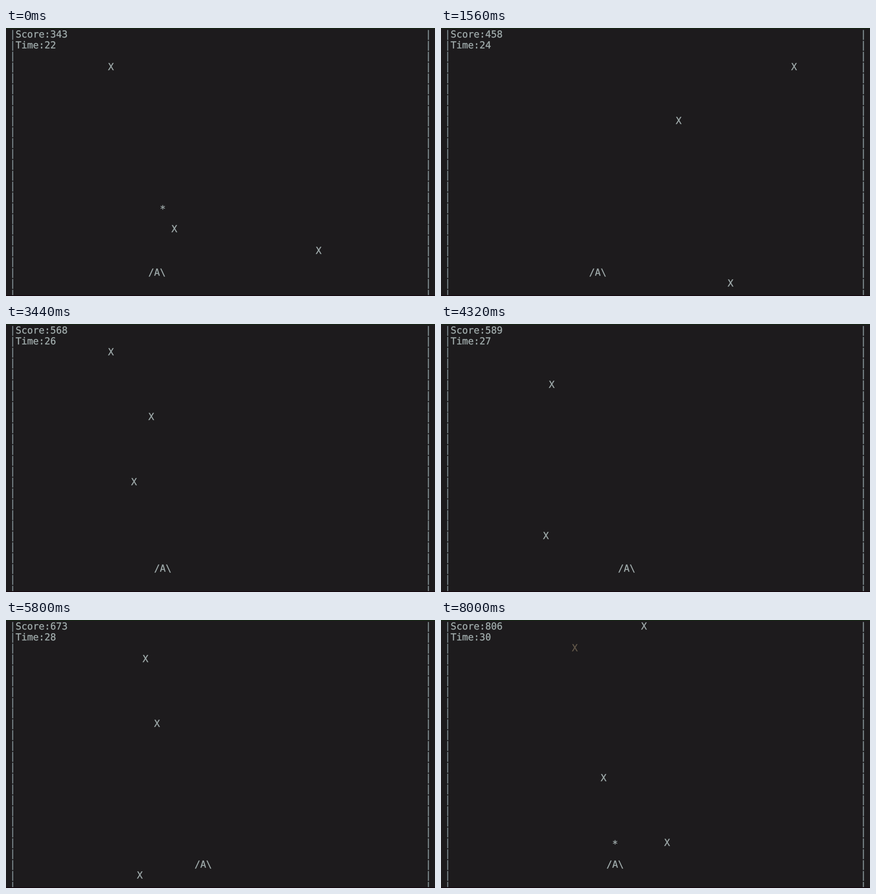
These frames come from a looping animation (947x592 px, 8.04 s). An HTML page:

```html
<!DOCTYPE html>
<html lang="en">
<head>
<meta charset="utf-8">
<title>Terminal shooter</title>
<style>
  html, body { margin: 0; width: 100%; height: 100%; overflow: hidden; background: #1d1b1d; }
  #stage {
    position: relative; width: 947px; height: 592px; overflow: hidden;
    background: #1d1b1d; color: #9da8a8;
    font: 21.16px/23.9px "DejaVu Sans Mono", monospace;
    text-rendering: geometricPrecision;
    -webkit-text-stroke: 0.45px;
  }
  #stage::before, #stage::after { content: ""; position: absolute; left: 0; right: 0; height: 1px; }
  #stage::before { top: 0; background: #10300f; }
  #stage::after { bottom: 0; height: 2px; background: #150a10; }
  #stage span { position: absolute; white-space: pre; }
  #stage .wall { color: #7f8d90; }
  #stage .ghost { color: #62584a; }
  #stage .bullet { margin-top: 3px; }
</style>
</head>
<body>
<div id="stage"></div>
<script>
const LOOP = 8040, FRAME = 40, STEP = 50.5;
const CELL_W = 12.74, CELL_H = 23.9, LEFT = 8.6, TOP = 2.2;
const ROWS = 25, LAST_COL = 72, SHIP_ROW = 22;
const KILL_POINTS = 26, PASS_POINTS = 21, LATE_PASS_POINTS = 35, LATE = 30;
const AIM_ROW = 13, AIM_REACH = 2;

const stepAt = t => Math.floor(t / STEP + 0.2);
const secondAt = t => 22 + Math.floor((t + 840) / 1000);

// Columns of new enemies, in order of arrival.
const arrivals = [26, 49, 26, 40, 60, 37, 26, 21, 24, 17, 18, 70, 22, 25, 23, 46, 69, 38, 27, 34];
// Column the ship heads for from a given step on.
const goals = { 5: 26, 36: 29, 56: 26, 70: 31, 100: 33, 122: 34, 146: 29 };

// Plays the whole round and keeps a snapshot of every step.
function play() {
  const game = {
    score: 343, ship: 25,
    bullet: { col: 26, row: 16 },
    enemies: [{ col: 17, row: 3 }, { col: 28, row: 18 }, { col: 53, row: 20 }]
  };
  const history = [structuredClone(game)];
  let goal = game.ship, next = 0;

  const respawn = (enemy, points) => {
    game.score += points;
    enemy.row = 0;
    enemy.col = arrivals[next++];
  };

  for (let n = 1; n <= stepAt(LOOP); n++) {
    goal = goals[n] ?? goal;
    game.ship += Math.sign(goal - game.ship);
    if (game.bullet) game.bullet.row--;

    for (const enemy of game.enemies) {
      enemy.row++;
      const shot = game.bullet;
      if (shot && shot.col === enemy.col && shot.row <= enemy.row) {
        game.bullet = null;
        respawn(enemy, KILL_POINTS);
      } else if (enemy.row > ROWS) {
        respawn(enemy, secondAt(n * STEP) < LATE ? PASS_POINTS : LATE_PASS_POINTS);
      } else if (!shot && enemy.row === AIM_ROW && Math.abs(enemy.col - game.ship) <= AIM_REACH) {
        game.bullet = { col: game.ship, row: SHIP_ROW - 1 };
      }
    }
    history.push(structuredClone(game));
  }
  return history;
}

const stage = document.getElementById('stage');

function sprite(text, cls = '') {
  const el = document.createElement('span');
  el.textContent = text;
  el.className = cls;
  stage.append(el);
  return el;
}

function place(el, col, row) {
  el.style.left = LEFT + col * CELL_W + 'px';
  el.style.top = TOP + row * CELL_H + 'px';
}

const show = (el, on) => { el.style.visibility = on ? 'visible' : 'hidden'; };

for (let row = 0; row < ROWS; row++) {
  for (const col of [0, LAST_COL]) place(sprite('|', 'wall'), col, row);
}
const history = play();
const enemyEls = history[0].enemies.map(() => sprite('X'));
const score = sprite(''), clock = sprite(''), ship = sprite('/A\\');
const bullet = sprite('*', 'bullet'), ghost = sprite('X', 'ghost');
place(score, 1, 0);
place(clock, 1, 1);
place(ghost, 22, 2);

function draw(t) {
  const n = stepAt(t), game = history[n];
  game.enemies.forEach((enemy, i) => place(enemyEls[i], enemy.col, enemy.row));
  show(bullet, game.bullet);
  if (game.bullet) place(bullet, game.bullet.col, game.bullet.row);
  place(ship, game.ship - 1, SHIP_ROW);
  score.textContent = 'Score:' + game.score;
  clock.textContent = 'Time:' + secondAt(t);
  show(ghost, n >= stepAt(LOOP - FRAME));
}

const start = performance.now();
function tick() {
  const t = (performance.now() - start) % LOOP;
  draw(Math.floor(t / FRAME) * FRAME);
  requestAnimationFrame(tick);
}
tick();
</script>
</body>
</html>
```
